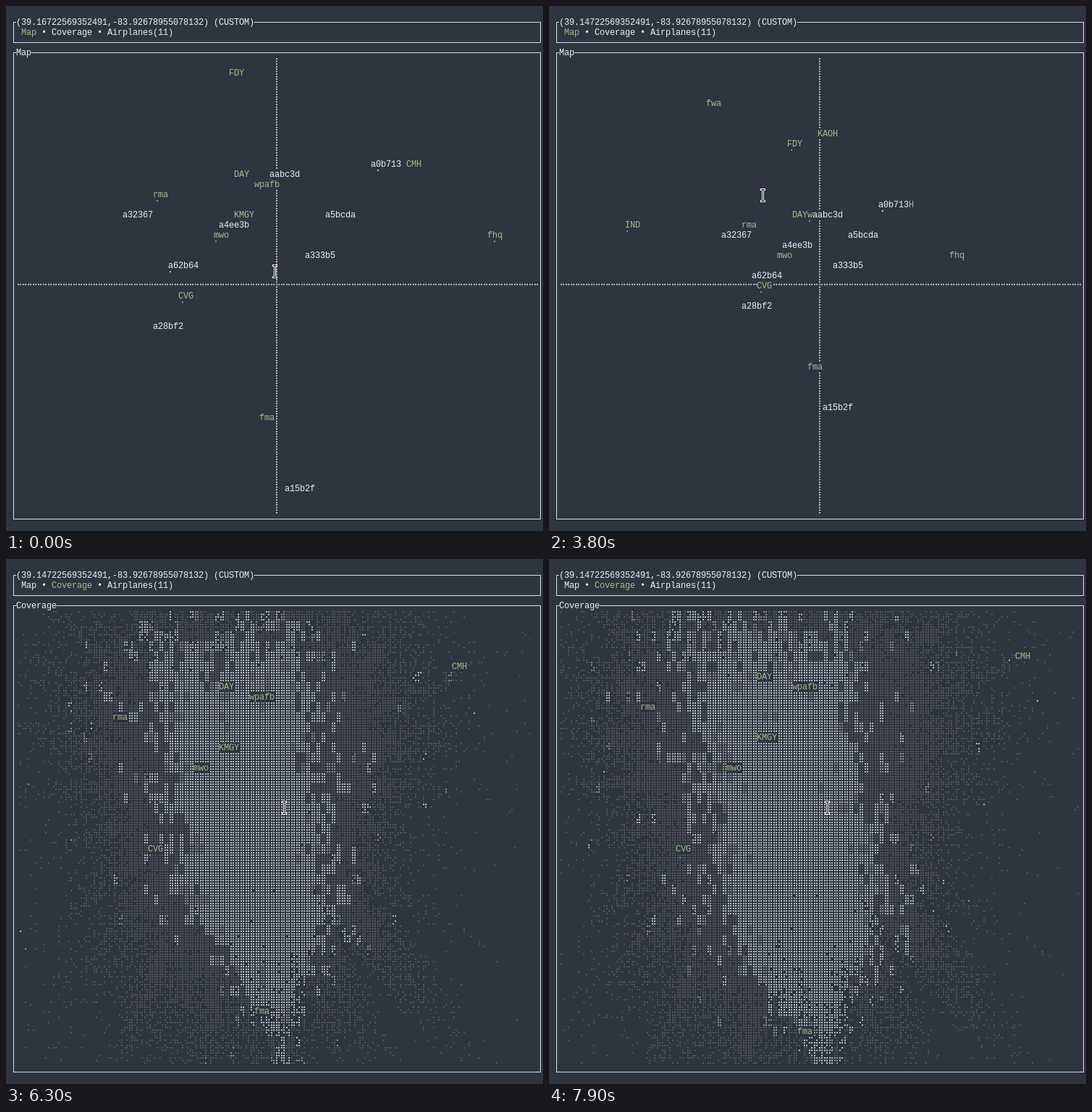
These frames come from a looping animation (742x725 px, 8000 ms). An HTML page with a canvas:

```html
<!DOCTYPE html>
<html lang="en">
<head>
<meta charset="utf-8">
<title>Radar terminal</title>
<style>
html, body { margin: 0; height: 100%; overflow: hidden; background: #2e3440; }
canvas { display: block; }
</style>
</head>
<body>
<canvas id="stage" width="742" height="725"></canvas>
<script>
const ctx = document.getElementById('stage').getContext('2d');
const LOOP = 8000;
const BG = '#2e3440', FG = '#eceff4', GREEN = '#a3be8c', LINE = '#d8dee9';
const CELL_W = 7, CELL_H = 14, COLS = 103, ROWS = 45, LEFT = 14, TOP = 71;
const DOTS_X = COLS * 2, DOTS_Y = ROWS * 4, DOT_PITCH = 3.5, DOT_SIZE = 1.7;
const COLS_PER_LON = 25, ROWS_PER_LAT = 15.35;

// Offsets from the home position in character cells at zoom 0.
const airports = [
  ['FDY', -8.65, -21.1], ['CMH', 26.8, -12.2], ['DAY', -7.85, -10.6],
  ['wpafb', -3.1, -9.78], ['rma', -23.3, -8.5], ['KMGY', -7.85, -6.4],
  ['mwo', -11.8, -4.52], ['fhq', 42.7, -4.37], ['CVG', -18.6, 1.32],
  ['fma', -2.45, 12.99], ['KAOH', 0.5, -23.2], ['fwa', -34.4, -27.6], ['IND', -61, -8.4],
];
const planes = [
  ['a0b713', 19.75, -11.45], ['aabc3d', -0.25, -10.65], ['a32367', -29.15, -7.15],
  ['a4ee3b', -10.68, -6.15], ['a5bcda', 10.75, -7.15], ['a333b5', 6.2, -2.925],
  ['a62b64', -20.75, -1.45], ['a28bf2', -23.45, 3.83], ['a15b2f', 2.25, 19.7],
];

const clamp = (v, lo, hi) => Math.min(hi, Math.max(lo, v));
const smooth = p => p * p * (3 - 2 * p);
const mix = (from, to, p) => from.map((v, i) => Math.round(v + (to[i] - v) * p));

// Progress 0..1 in `count` equal jumps, the first one at `start`.
const steps = (t, start, count, interval = 100) =>
  clamp(Math.floor((t - start) / interval) + 1, 0, count) / count;

function zoomAt(t) {
  const scroll = (start, count, amount) => amount * steps(t, start, count);
  return Math.trunc(
    scroll(2300, 3, -4) + scroll(2900, 1, -1)
    + scroll(5700, 1, 1) + scroll(5900, 1, 3) + scroll(6200, 2, 4) + scroll(6500, 1, 4)
    + scroll(6800, 2, 4) + scroll(7500, 2, -4) + scroll(7900, 1, -3));
}

function cursorAt(t, west, north) {
  const rest = [369, 339], tab = [84, 41], centre = [384, 343];
  if (t < 400) return [371, 366];
  if (t < 600) return [363, 362];
  if (t < 2300) return [362 + Math.round(west * 4.1), 361 + north * 5];
  if (t < 5000) return mix(rest, tab, Math.sin(steps(t, 3800, 4, 200) * Math.PI / 2) ** 1.4);
  return mix(tab, centre, smooth(steps(t, 5000, 4)));
}

function stateAt(t) {
  // The drag swings out and back, in hundredths of a degree.
  const drag = steps(t, 800, 12), swing = Math.sin(drag * Math.PI);
  const west = Math.round(13.4 * swing ** 2);
  const north = Math.round(5.4 * swing - 2 * drag);
  return { zoom: zoomAt(t), west, north, cursor: cursorAt(t, west, north), coverage: t >= 4700 };
}

function seededRandom(seed) {
  return () => {
    seed = (seed + 0x6d2b79f5) | 0;
    let n = Math.imul(seed ^ (seed >>> 15), 1 | seed);
    n = (n + Math.imul(n ^ (n >>> 7), 61 | n)) ^ n;
    return ((n ^ (n >>> 14)) >>> 0) / 4294967296;
  };
}

// Reception range by bearing (clockwise from east), in pixels at zoom 0.
function rangeAt(a) {
  const outline = 186 + 16 * Math.sin(a) - 34 * Math.cos(2 * a) - 24 * Math.sin(3 * a);
  const streaks = 0.07 * Math.sin(23 * a) + 0.05 * Math.sin(41 * a + 1) + 0.04 * Math.sin(67 * a);
  const spoke = 50 * Math.exp(-(((a - 0.85) / 0.08) ** 2));
  return outline * (1 + streaks) + spoke;
}

// The busy core leans right and narrows into a southern corridor.
const coreOffset = (x, y) => Math.abs(x + 25 - 0.14 * y);
const inCorridor = (x, y) => y > 120 && y < 345 && coreOffset(x, y) < 13;

function seenChance(x, y) {
  const dx = x + 35, dy = y + 60;
  const chance = 1 / (1 + (Math.hypot(dx, dy) / rangeAt(Math.atan2(dy, dx))) ** 9);
  return inCorridor(x, y) ? Math.max(chance, 0.95 - (y - 120) / 300) : chance;
}

function busyChance(x, y) {
  const halfWidth = clamp(115 - y / 2, 8, 75);
  const w = Math.max(coreOffset(x, y) / halfWidth, -y / 195, y / 260);
  return 0.004 + 0.996 / (1 + w ** 6);
}

// Positions are rounded to a fixed grid, which gives the banding when zoomed in.
const seen = [];
const random = seededRandom(11);
for (let l = -230; l < 230; l++) {
  for (let k = -280; k < 280; k++) {
    const x = (k + 0.7) * 1.81, y = l * 2.05;
    if (random() >= seenChance(x, y)) continue;
    const luck = random(), busy = busyChance(x, y);
    seen.push({ x, y, color: luck < busy ? FG : luck < busy * 1.15 + 0.01 ? '#b4b4b4' : '#646464' });
  }
}

function write(text, col, row, color) {
  [...text].forEach((ch, i) => {
    if (col + i >= COLS) return;
    const x = LEFT + (col + i) * CELL_W, y = TOP + row * CELL_H;
    ctx.fillStyle = BG;
    ctx.fillRect(x, y, CELL_W, CELL_H);
    ctx.fillStyle = color;
    ctx.fillText(ch, x, y + 11);
  });
}

const onScreen = (x, y) => x >= 0 && y >= 0 && x < DOTS_X && y < DOTS_Y;
const cellOf = (x, y) => (y >> 2) * COLS + (x >> 1);

function dot(x, y, color) {
  if (!onScreen(x, y)) return;
  ctx.fillStyle = color;
  ctx.fillRect(LEFT + (x >> 1) * CELL_W + 2.2 + (x & 1) * 3.1,
    TOP + (y >> 2) * CELL_H + 1.1 + (y & 3) * 3.6, DOT_SIZE, DOT_SIZE);
}

function frame(top, bottom, title) {
  ctx.fillStyle = LINE;
  ctx.fillRect(10, top, 729, 1);
  ctx.fillRect(10, bottom, 729, 1);
  ctx.fillRect(10, top, 1, bottom - top);
  ctx.fillRect(738, top, 1, bottom - top);
  write(title, 0, (top - 7 - TOP) / CELL_H, FG);
}

function drawHeader({ west, north, coverage }) {
  const lat = 39.16 + north / 100, lon = 83.92 + west / 100;
  const latText = lat.toFixed(2) + '72256935249' + (lat > 39.195 ? 2 : 1);
  const lonText = lon.toFixed(2) + '67895507813' + (lon > 83.995 ? '' : 2);
  frame(22, 50, `(${latText},-${lonText}) (CUSTOM)`);
  write(' Map • Coverage • Airplanes(11)', 0, -3, FG);
  if (coverage) write('Coverage', 7, -3, GREEN);
  else write('Map', 1, -3, GREEN);
  frame(64, 708, coverage ? 'Coverage' : 'Map');
}

// A character cell has one colour: that of the last point put into it.
function drawCoverage(scale) {
  const dots = new Set(), colors = [];
  for (const p of seen) {
    const x = Math.floor(102.5 + p.x * scale / DOT_PITCH);
    const y = Math.floor(89.5 + p.y * scale / DOT_PITCH);
    if (!onScreen(x, y) || x === DOTS_X - 1 || y === DOTS_Y - 1) continue;
    dots.add(y * DOTS_X + x);
    colors[cellOf(x, y)] = p.color;
  }
  for (const d of dots) {
    const x = d % DOTS_X, y = Math.floor(d / DOTS_X);
    dot(x, y, colors[cellOf(x, y)]);
  }
}

function drawCrosshair() {
  for (let x = 0; x < DOTS_X; x++) dot(x, 89, FG);
  for (let y = 0; y < DOTS_Y; y++) if (y !== 89) dot(102, y, FG);
}

function drawPlaces(list, color, scale, { west, north }) {
  const placed = list.map(([name, x, y]) => [name,
    (x + west / 100 * COLS_PER_LON) * scale,
    (y + (north + 2) / 100 * ROWS_PER_LAT) * scale]);
  for (const [, u, v] of placed) {
    dot(Math.floor(102.5 + u * 205 / 102), Math.floor(89.5 + v * 179 / 44), color);
  }
  for (const [name, u, v] of placed) {
    const col = Math.floor(51 + u), row = Math.floor(22 + v);
    if (col >= 0 && col < COLS && row >= 0 && row < ROWS) write(name, col, row, color);
  }
}

function drawCursor([x, y]) {
  ctx.fillStyle = '#fff';
  ctx.fillRect(x - 3, y - 9, 7, 3);
  ctx.fillRect(x - 3, y + 7, 7, 3);
  ctx.fillRect(x - 1, y - 9, 3, 18);
  ctx.fillStyle = '#111';
  ctx.fillRect(x - 2, y - 8, 5, 1);
  ctx.fillRect(x - 2, y + 8, 5, 1);
  ctx.fillRect(x, y - 8, 1, 17);
}

function draw(state) {
  const scale = 1.1 ** state.zoom;
  ctx.fillStyle = BG;
  ctx.fillRect(0, 0, 742, 725);
  ctx.font = '12px "Liberation Mono", monospace';
  drawHeader(state);
  if (state.coverage) drawCoverage(scale);
  else drawCrosshair();
  drawPlaces(airports, GREEN, scale, state);
  if (!state.coverage) drawPlaces(planes, FG, scale, state);
  drawCursor(state.cursor);
}

let shown = '';
function tick() {
  const state = stateAt(performance.now() % LOOP), key = JSON.stringify(state);
  if (key !== shown) draw(state);
  shown = key;
  requestAnimationFrame(tick);
}
tick();
</script>
</body>
</html>
```
